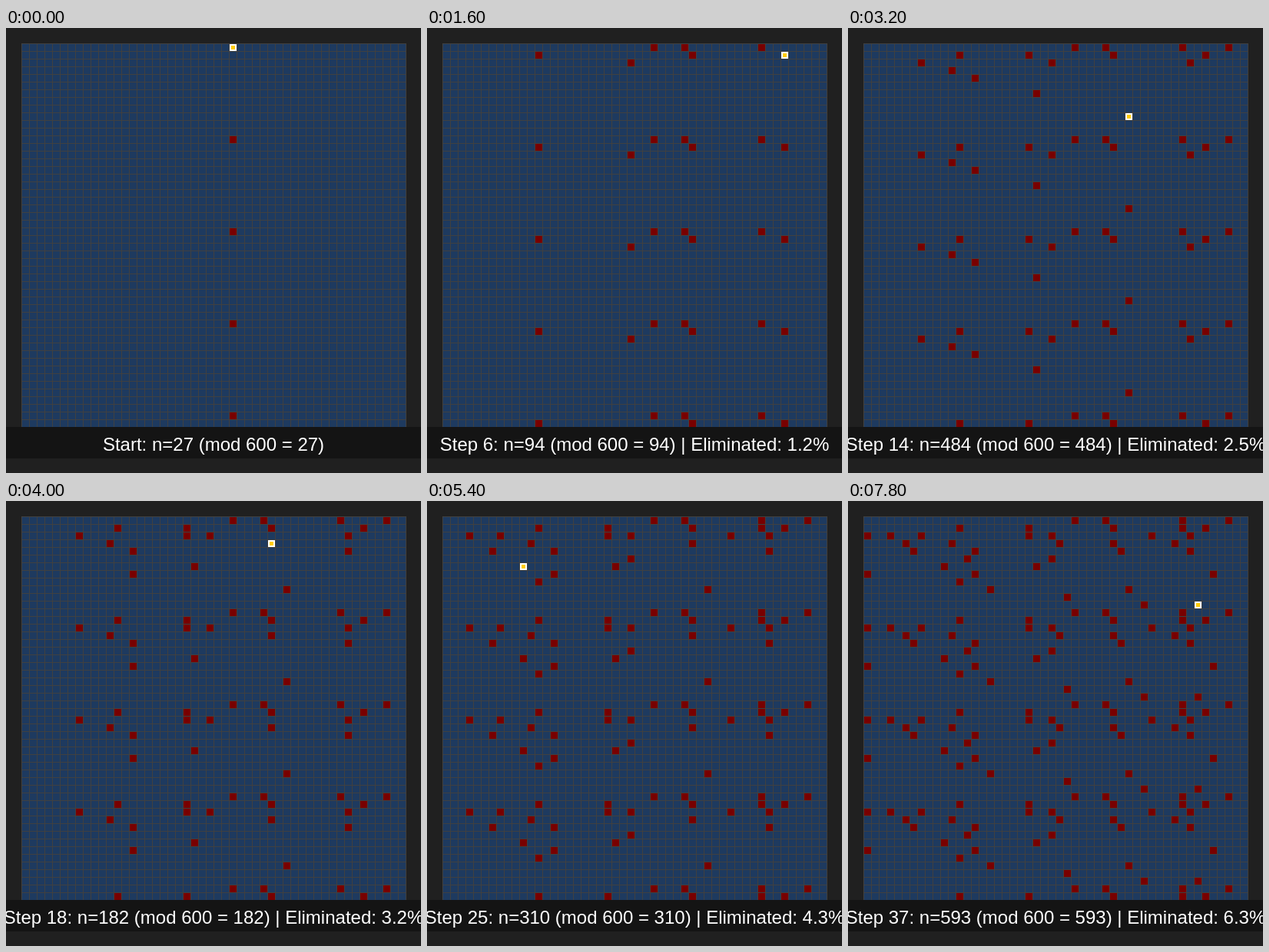
An HTML page with a canvas that plays this animation: 540 by 580 pixels, repeating every 8000 ms.

```html
<!DOCTYPE html>
<html lang="en">
<head>
<meta charset="utf-8">
<title>Collatz residues</title>
<style>
  html, body { margin: 0; width: 100%; height: 100%; overflow: hidden; background: #202020; }
  canvas { display: block; }
</style>
</head>
<body>
<canvas id="stage" width="540" height="580"></canvas>
<script>
const ctx = document.getElementById('stage').getContext('2d');
const LOOP = 8000, HOLD = 600, STEP = 200, LAST = 37;
const SIDE = 50, CELL = 10, PAD = 20, MOD = 600;

const path = [27];
while (path.length <= LAST) {
  const n = path[path.length - 1];
  path.push(n % 2 ? 3 * n + 1 : n / 2);
}

function box(color, x, y, w, h = w) {
  ctx.fillStyle = color;
  ctx.fillRect(x, y, w, h);
}

function fillCell(i, color, inset = 0) {
  const x = PAD + (i % SIDE) * CELL + 1 + inset;
  const y = PAD + Math.floor(i / SIDE) * CELL + 1 + inset;
  box(color, x, y, CELL - 1 - 2 * inset);
}

function caption(step, hits) {
  const n = path[step];
  const state = `n=${n} (mod ${MOD} = ${n % MOD})`;
  if (!step) return `Start: ${state}`;
  return `Step ${step}: ${state} | Eliminated: ${(hits / MOD * 100).toFixed(1)}%`;
}

function draw(step) {
  const size = SIDE * CELL;
  box('#202020', 0, 0, 540, 580);
  box('#1e3a5f', PAD, PAD, size);
  for (let i = 0; i <= SIDE; i++) {
    box('#404040', PAD + i * CELL, PAD, 1, size + 1);
    box('#404040', PAD, PAD + i * CELL, size + 1, 1);
  }

  const hits = new Set(path.slice(0, step + 1).map(n => n % MOD));
  for (const r of hits) {
    for (let i = r; i < SIDE * SIDE; i += MOD) fillCell(i, '#780000');
  }
  const current = path[step] % MOD;
  fillCell(current, '#ffffff');
  fillCell(current, '#ffcc00', 2);

  box('#141414', 0, 520, 540, 41);
  ctx.fillStyle = '#ffffff';
  ctx.font = '24px "Liberation Sans", Arial, sans-serif';
  ctx.textAlign = 'center';
  ctx.fillText(caption(step, hits.size), 270, 551);
}

const start = performance.now();
let shown = -1;
function tick() {
  const t = (performance.now() - start) % LOOP;
  const step = t < HOLD ? 0 : Math.min(LAST, Math.floor((t - HOLD) / STEP) + 1);
  if (step !== shown) draw(shown = step);
  requestAnimationFrame(tick);
}
tick();
</script>
</body>
</html>
```
